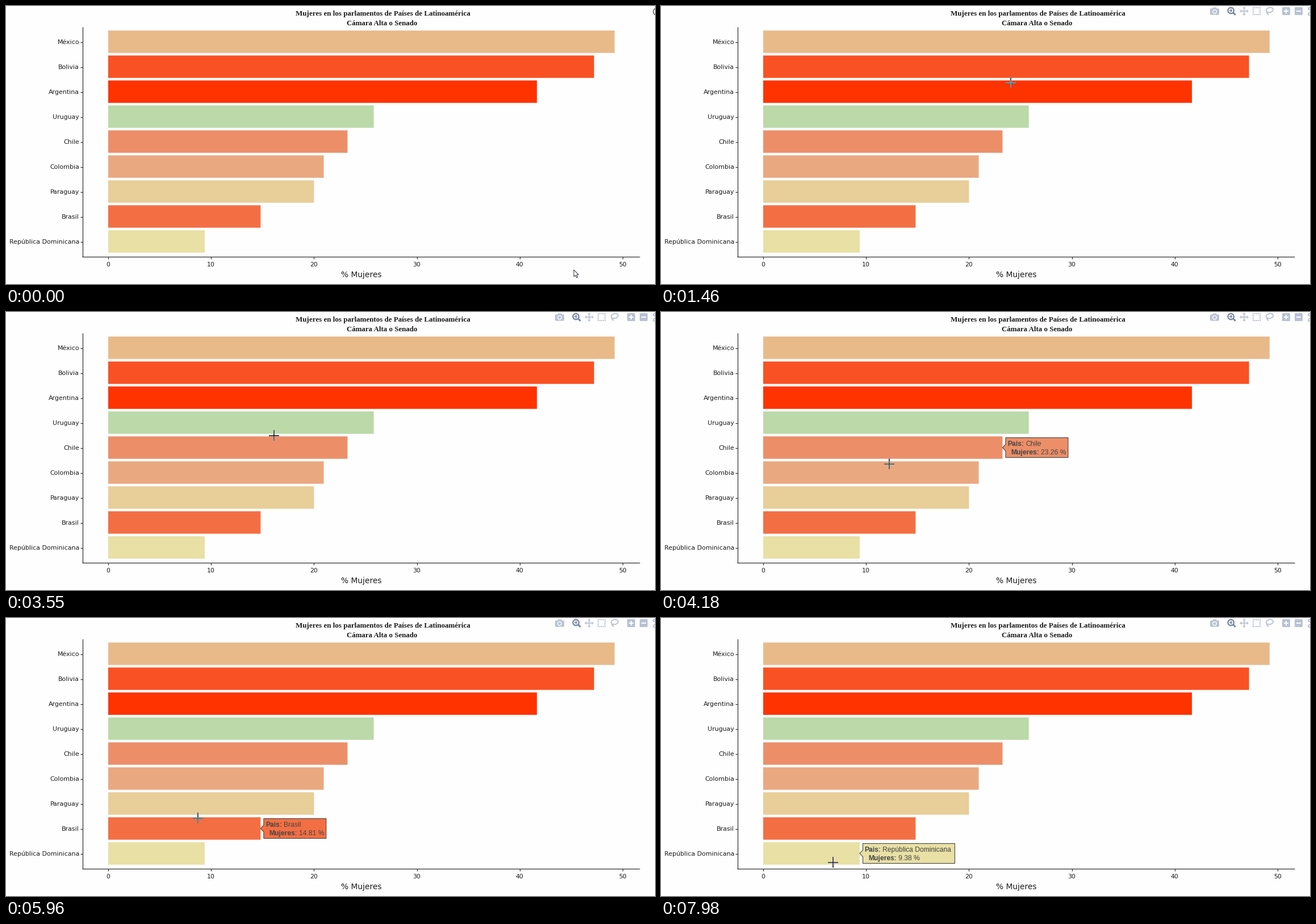
A matplotlib script that plays this animation: 1143 px wide and 490 px high, repeating every 8 s.

```python
import numpy as np
import matplotlib.pyplot as plt
from matplotlib.animation import FuncAnimation
from matplotlib.collections import LineCollection
from matplotlib.colors import to_rgb
from matplotlib.patches import Circle, Ellipse, FancyBboxPatch, Polygon, Rectangle

W, H, DPI = 1143, 490, 64
LOOP, STEP = 8000, 20
PT = 72 / DPI                       # points per pixel
X0, UNIT = 180, 18.12               # bar origin and pixels per percent
BAR_H = 39.5
BG, INK, TIP_INK = "#fefefe", "#1c1c1c", "#444444"
ICON, ICON_ON = "#b9c2d4", "#7a88a6"

# country, percent, colour, width of its hover label
ROWS = [
    ("México", 49.22, "#e8ba8a", 110),
    ("Bolivia", 47.22, "#f95124", 110),
    ("Argentina", 41.67, "#ff3300", 110),
    ("Uruguay", 25.81, "#bbd9a9", 110),
    ("Chile", 23.26, "#ec8f69", 110),
    ("Colombia", 20.95, "#eaa880", 110),
    ("Paraguay", 20, "#e8ce98", 93.5),
    ("Brasil", 14.81, "#f36f43", 110),
    ("República Dominicana", 9.38, "#e8e0a4", 162),
]

# periods of movement: first change, last change, number of changes
SPANS = [
    (70, 600, 8), (830, 1610, 11), (1690, 1690, 1), (2300, 2860, 8),
    (3320, 3780, 7), (4100, 4410, 5), (4790, 5260, 7), (5720, 6130, 6),
    (6510, 6900, 6), (7910, 7980, 2),
]

# pointer path: time, x, y
PATH = np.array([
    (0, 1000, 465), (300, 800, 230), (450, 722, 150), (600, 692, 88),
    (750, 692, 88), (1454, 615, 134), (1610, 588, 146), (1689, 588, 146),
    (1690, 586, 146), (2220, 586, 146), (2700, 510, 183), (2860, 489, 192),
    (3243, 489, 192), (3780, 457, 236), (4022, 457, 236), (4177, 401, 267),
    (4410, 366, 287), (4712, 366, 287), (4947, 362, 304), (5260, 352, 330),
    (5638, 352, 330), (5966, 337, 352), (6130, 324, 372), (6432, 324, 372),
    (6900, 303, 420), (7840, 303, 420), (7980, 302, 430),
])

# hovered row from each time on
HOVER = [
    (0, None), (440, 2), (510, 1), (1370, None), (1520, 2), (2530, None),
    (2690, 3), (3540, None), (3620, 4), (4250, 5), (5015, 6), (5955, 7),
    (6660, 8),
]

fig = plt.figure(figsize=(W / DPI, H / DPI), dpi=DPI, facecolor=BG)
ax = fig.add_axes([0, 0, 1, 1])
ax.set_xlim(0, W)
ax.set_ylim(H, 0)
ax.axis("off")


def label(x, y, s, size, font="DejaVu Sans", color=INK, **kw):
    return ax.text(x, y, s, fontsize=size * PT, family=font, color=color,
                   va="baseline", **kw)


def lines(segments, color, width, **kw):
    return ax.add_collection(LineCollection(
        segments, colors=color, linewidths=width * PT, **kw), autolim=False)


def row_y(i):
    return 63 + 44 * i


def bar_end(i):
    return X0 + UNIT * ROWS[i][1]


def draw_chart():
    ticks = [((134, 441.5), (1116, 441.5)), ((134.5, 37), (134.5, 442))]
    for i, (name, value, color, _) in enumerate(ROWS):
        y = row_y(i)
        ax.add_patch(Rectangle((X0, y - BAR_H / 2), UNIT * value, BAR_H,
                               fc=color, lw=0, snap=False))
        label(129, y + 4, name, 11, ha="right")
        ticks.append(((131, y + 0.5), (134.5, y + 0.5)))
    for v in range(0, 51, 10):
        x = X0 + UNIT * v
        label(x, 459, str(v), 11, ha="center")
        ticks.append(((x, 442), (x, 445.5)))
    lines(ticks, "#2a2a2a", 1.2)
    label(626, 478, "% Mujeres", 13.8, ha="center")
    title = dict(size=13, font="Liberation Serif", weight="bold", ha="center")
    label(664, 17, "Mujeres en los parlamentos de Países de Latinoamérica",
          **title)
    label(662.5, 33.5, "Cámara Alta o Senado", **title)


def draw_toolbar():
    items = []

    def shape(patch):
        items.append(ax.add_patch(patch))

    def strokes(segments, color, width, **kw):
        items.append(lines(segments, color, width, **kw))

    def block(x, y, w, h, r=1.5):
        shape(FancyBboxPatch((x + r, y + r), w - 2 * r, h - 2 * r, fc=ICON,
                             lw=0, boxstyle=f"round,pad={r}"))

    # camera
    block(967, 4.5, 16, 11)
    block(971.5, 2.5, 7, 5, 1)
    shape(Circle((975, 9.8), 3.3, fc=ICON, ec=BG, lw=1.4 * PT))

    # magnifier
    shape(Circle((1003.7, 8), 5.2, fc="none", ec=ICON_ON, lw=2.3 * PT))
    strokes([((1007.5, 11.5), (1011.8, 15.8))], ICON_ON, 3)
    strokes([((1001, 8), (1006.4, 8)), ((1003.7, 5.3), (1003.7, 10.7))],
            ICON_ON, 1.6)

    # move arrows
    cx, cy = 1027, 9
    strokes([((cx - 6, cy), (cx + 6, cy)), ((cx, cy - 6), (cx, cy + 6))],
            ICON, 1.7)
    for dx, dy in ((1, 0), (-1, 0), (0, 1), (0, -1)):
        tip = (cx + 8 * dx, cy + 8 * dy)
        base = [(cx + 4.8 * dx + s * dy, cy + 4.8 * dy + s * dx)
                for s in (-3, 3)]
        shape(Polygon([tip, *base], fc=ICON, lw=0))

    # dotted box
    dots = np.arange(1042, 1056, 3)
    strokes([((x, y), (x + 2, y)) for x in dots for y in (3, 15)], ICON, 2)
    strokes([((x, y), (x, y + 2)) for x in (1043, 1055)
             for y in (5, 8, 11)], ICON, 2)

    # lasso
    shape(Ellipse((1072, 7), 12.5, 8.4, angle=-12, fc="none", ec=ICON,
                  lw=1.9 * PT))
    strokes([((1067.5, 10), (1067, 12.5), (1069, 13.3), (1069.5, 15.8))],
            ICON, 1.8)

    # plus and minus
    for x in (1094, 1116):
        block(x, 2, 14, 14)
        strokes([((x + 3, 9), (x + 11, 9))], BG, 2)
    strokes([((1101, 5), (1101, 13))], BG, 2)

    # last button, cut by the edge
    strokes([((1143, 2.5), (1139.5, 2.5), (1139.5, 6.5)),
             ((1143, 15.5), (1139.5, 15.5), (1139.5, 11.5)),
             ((1141, 5), (1143, 7.5)), ((1141, 13), (1143, 10.5))], ICON, 1.7)
    return items


def draw_arrow():
    outline = [(0, 0), (0, 12), (2.8, 9.6), (4.8, 13.8), (6.8, 13),
               (4.9, 8.8), (8.4, 8.6)]
    return [
        ax.add_patch(Polygon(np.array(outline) + (1000, 465), fc="white",
                             ec="#333340", lw=PT)),
        ax.add_patch(Ellipse((1146.5, 10), 13, 13, fc="none", ec="#30343c",
                             lw=1.2 * PT)),
    ]


draw_chart()
toolbar = draw_toolbar()
arrow = draw_arrow()
tip_box = ax.add_patch(Polygon([(0, 0), (1, 1), (0, 1)], ec=TIP_INK,
                               lw=1.1 * PT, joinstyle="miter"))
tip_text = [
    label(0, 0, s, 12.1, "Liberation Sans", TIP_INK, weight=w)
    for s, w in (("Pais:", "bold"), ("", "normal"),
                 ("Mujeres:", "bold"), ("", "normal"))
]
cross = lines([], INK, 1.5)


def stepped(t):
    """Time of the latest change of the picture."""
    last = 0
    for a, b, n in SPANS:
        if t < a:
            break
        gap = (b - a) / (n - 1) if n > 1 else 1
        last = a + min(int((t - a + 10) / gap), n - 1) * gap
    return last


def inverse(x, y):
    """Inverted colour of the chart at a point."""
    for i, row in enumerate(ROWS):
        if abs(y - row_y(i)) < BAR_H / 2 and X0 < x < bar_end(i):
            return tuple(1 - c for c in to_rgb(row[2]))
    return (0, 0, 0)


def show_tip(i):
    for item in (tip_box, *tip_text):
        item.set_visible(i is not None)
    if i is None:
        return
    name, value, color, width = ROWS[i]
    x, y = bar_end(i), row_y(i)
    left, right = x + 5.5, x + 5.5 + width
    tip_box.set_xy([(x, y), (left, y - 6), (left, y - 17.5),
                    (right, y - 17.5), (right, y + 17.5), (left, y + 17.5),
                    (left, y + 6)])
    tip_box.set_facecolor(color)
    spots = ((3, -3.2), (35, -3.2), (9.7, 12.3), (62.5, 12.3))
    for item, (dx, dy) in zip(tip_text, spots):
        item.set_position((left + dx, y + dy))
    tip_text[1].set_text(name)
    tip_text[3].set_text(f"{value} %")


def show_cross(t):
    x, y = (round(np.interp(t, PATH[:, 0], PATH[:, k])) for k in (1, 2))
    cx, cy = x + 0.5, y + 0.5
    rows = range(y - 9, y + 10)
    cross.set_segments([((cx, r), (cx, r + 1)) for r in rows]
                       + [((cx - 9, cy), (cx + 9, cy))])
    cross.set_color([inverse(cx, r + 0.5) for r in rows] + [inverse(cx, cy)])


def update(frame):
    t = stepped(frame * STEP)
    inside = t > 0
    for item in arrow:
        item.set_visible(not inside)
    for item in (*toolbar, cross):
        item.set_visible(inside)
    show_cross(t)
    show_tip([row for start, row in HOVER if start <= t][-1])
    return []


anim = FuncAnimation(fig, update, frames=LOOP // STEP, interval=STEP,
                     init_func=lambda: [], repeat=True, repeat_delay=0)
plt.show()
```
